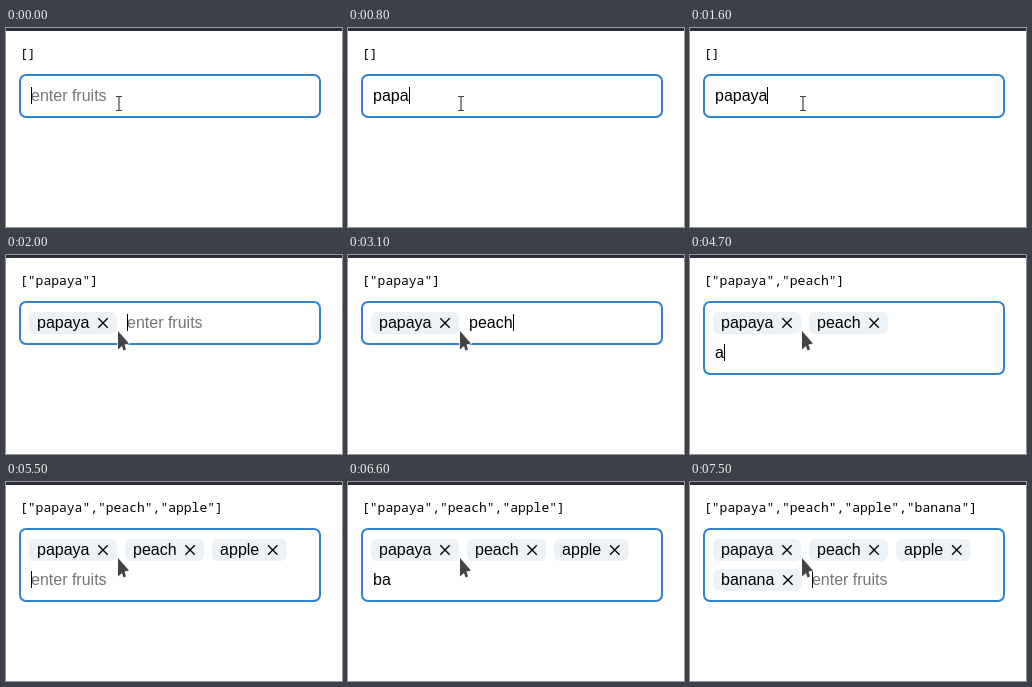
An HTML page with a canvas for the animation above (8 s loop, 336 by 199 pixels).

```html
<!DOCTYPE html>
<html lang="en">
<head>
<meta charset="utf-8">
<title>Tag input</title>
<style>
  html, body { margin: 0; width: 100%; height: 100%; overflow: hidden; background: #fff; }
  canvas { display: block; width: 336px; height: 199px; }
</style>
</head>
<body>
<canvas id="stage"></canvas>
<script>
const W = 336, H = 199, LOOP = 8000;
const BLINK = 600, ROW = 30;
const SANS = '16px "Liberation Sans", Arial, sans-serif';
const MONO = '13px "Noto Sans Mono", monospace';

// Each word: key press times, then the time Enter turns it into a tag.
const words = [
  { text: 'papaya', keys: [400, 500, 700, 800, 1500, 1600], enter: 2000 },
  { text: 'peach', keys: [2600, 2700, 2800, 3000, 3100], enter: 3600 },
  { text: 'apple', keys: [4700, 4800, 4900, 5100, 5200], enter: 5500 },
  { text: 'banana', keys: [5900, 6000, 6700, 6900, 7000, 7100], enter: 7500 }
];

const canvas = document.getElementById('stage');
const ctx = canvas.getContext('2d');
const dpr = window.devicePixelRatio || 1;
canvas.width = W * dpr;
canvas.height = H * dpr;

function stateAt(t) {
  const tags = words.filter(w => t >= w.enter).map(w => w.text);
  const word = words[tags.length];
  const typed = word ? word.text.slice(0, word.keys.filter(k => t >= k).length) : '';
  // The caret restarts its blink on every key.
  let last = -300;
  for (const w of words)
    for (const k of [...w.keys, w.enter]) if (k <= t) last = k;
  return { tags, typed, caret: Math.floor((t - last) / BLINK) % 2 === 0 };
}

function label(text, x, y, font, color) {
  ctx.font = font;
  ctx.fillStyle = color;
  ctx.fillText(text, x, y);
}

function textWidth(text) {
  ctx.font = SANS;
  return ctx.measureText(text).width;
}

function roundBox(x, y, w, h, r) {
  ctx.beginPath();
  ctx.roundRect(x, y, w, h, r);
}

function polygon(points) {
  ctx.beginPath();
  points.forEach(([x, y]) => ctx.lineTo(x, y));
  ctx.closePath();
}

// Draws one tag and returns its full width.
function drawTag(text, x, y) {
  const tw = textWidth(text), w = tw + 35.5;
  roundBox(x, y, w, 22, 6);
  ctx.fillStyle = '#edf2f7';
  ctx.fill();
  label(text, x + 8, y + 16, SANS, '#000');
  const cx = x + tw + 21.5, cy = y + 11, r = 4.7;
  ctx.beginPath();
  ctx.moveTo(cx - r, cy - r);
  ctx.lineTo(cx + r, cy + r);
  ctx.moveTo(cx + r, cy - r);
  ctx.lineTo(cx - r, cy + r);
  ctx.strokeStyle = '#000';
  ctx.lineWidth = 1.3;
  ctx.stroke();
  return w;
}

function drawBeam() {
  ctx.beginPath();
  for (const y of [68.5, 82.5]) {
    ctx.moveTo(110, y);
    ctx.lineTo(116, y);
  }
  ctx.moveTo(113, 68.5);
  ctx.lineTo(113, 82.5);
  ctx.strokeStyle = '#fff';
  ctx.lineWidth = 3;
  ctx.stroke();
  ctx.strokeStyle = '#444';
  ctx.lineWidth = 1.2;
  ctx.stroke();
}

function drawArrow() {
  polygon([[112, 76], [112, 94.5], [116, 91], [117.5, 95.5], [120, 94.5], [118.5, 89.5], [123, 88.5]]);
  ctx.lineJoin = 'round';
  ctx.strokeStyle = '#fff';
  ctx.lineWidth = 1.6;
  ctx.stroke();
  ctx.fillStyle = '#444';
  ctx.fill();
}

function draw(t) {
  const { tags, typed, caret } = stateAt(t);
  ctx.setTransform(dpr, 0, 0, dpr, 0, 0);
  ctx.fillStyle = '#fff';
  ctx.fillRect(0, 0, W, H);
  ctx.fillStyle = '#2c2d39';
  ctx.fillRect(0, 0, W, 3);

  label(JSON.stringify(tags), 14, 30, MONO, '#000');

  roundBox(14, 47, 300, tags.length > 1 ? 72 : 42, 6);
  ctx.strokeStyle = '#3182ce';
  ctx.lineWidth = 2;
  ctx.stroke();

  let x = 23, y = 57;
  tags.forEach((tag, i) => {
    if (i === 3) { x = 23; y += ROW; }
    x += drawTag(tag, x, y) + 8;
  });
  // The field wraps when the first row has no room for it.
  if (tags.length === 2 || tags.length === 3) { x = 23; y += ROW; }

  x += 2;
  label(typed || 'enter fruits', x, y + 16, SANS, typed ? '#000' : '#757575');
  if (caret) {
    ctx.fillStyle = '#000';
    ctx.fillRect(Math.round(x + textWidth(typed)), y + 2, 1, 17);
  }

  if (t < words[0].enter) drawBeam();
  else drawArrow();
}

const start = performance.now();
function tick() {
  draw((performance.now() - start) % LOOP);
  requestAnimationFrame(tick);
}
tick();
</script>
</body>
</html>
```
